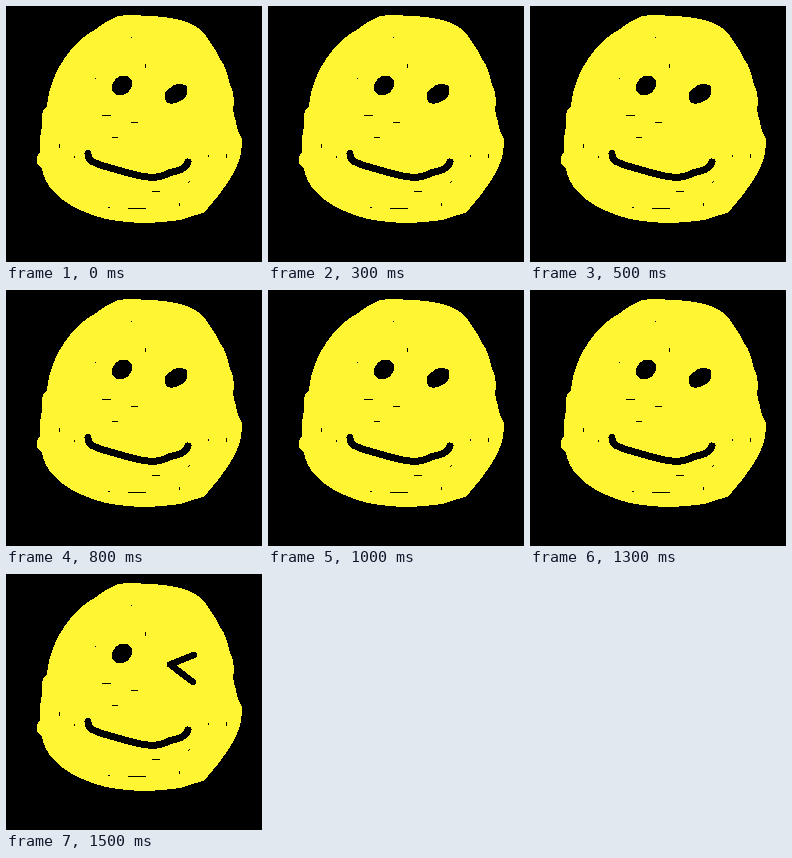
These frames come from a looping animation (256 by 256 pixels, 2000 ms). An HTML page:

```html
<!DOCTYPE html>
<html lang="en">
<head>
<meta charset="utf-8">
<title>Winking face</title>
<style>
  html, body { margin: 0; height: 100%; overflow: hidden; background: #000; }
  svg { display: block; width: 100vw; height: 100vh; }
  .line { fill: none; stroke: #000; stroke-linecap: round; stroke-linejoin: round; }
</style>
</head>
<body>
<svg viewBox="0 0 256 256" shape-rendering="crispEdges">
  <path fill="#fff533" d="M112 10 Q126 8 140 10 Q156 10 170 13 Q181 15 189 20 Q197 25 202 33
    Q209 42 214 53 Q221 62 223 76 Q228 86 228 97 Q226 105 230 116 Q231 125 236 133
    Q236 146 233 155 Q229 166 222 176 Q213 190 202 202 L197 207 Q185 210 174 214
    Q155 217 136 217 Q116 216 100 213 Q84 209 70 202 Q56 195 46 184 Q38 174 36 163
    L31 157 V151 L34 146 Q33 133 36 121 Q35 112 37 104 L41 101 Q42 88 46 77
    Q52 60 64 45 Q74 32 90 23 Q100 15 112 10Z"/>
  <!-- gaps left by the crayon -->
  <path class="line" stroke-width="1" d="M125 31v1M140 58l-1 4M89 72v1M96 109h9M125 116h7M106 132l6-1
    M54 138l-1 4M68 150l1 2M203 149l-1 2M221 148l-1 4M146 185h8M122 202h18M102 201h2M174 197l-1 3M184 175l-2 2"/>
  <ellipse cx="116" cy="79.5" rx="11" ry="9" transform="rotate(-42 116 79.5)"/>
  <path id="openEye" d="M159 89 Q159 84 164 82 Q169 77 176 78 L181 80 V88 Q179 93 174 95 Q168 99 162 97 Q158 95 159 89Z"/>
  <path id="wink" class="line" stroke-width="6.5" d="M188 81 L164 90.5 L187 108"/>
  <path class="line" stroke-width="7" d="M82 147.5 Q82 153 86 155.5 Q93 159 103 161.5 Q115 165 126 168 Q137 171 146 171.5
    Q156 171 164 166.5 Q180 164 182 156"/>
</svg>
<script>
  const openEye = document.getElementById('openEye');
  const wink = document.getElementById('wink');
  const LOOP = 2000, WINK_START = 1500;

  function draw() {
    const winking = performance.now() % LOOP >= WINK_START;
    openEye.style.display = winking ? 'none' : '';
    wink.style.display = winking ? '' : 'none';
    requestAnimationFrame(draw);
  }
  draw();
</script>
</body>
</html>
```
